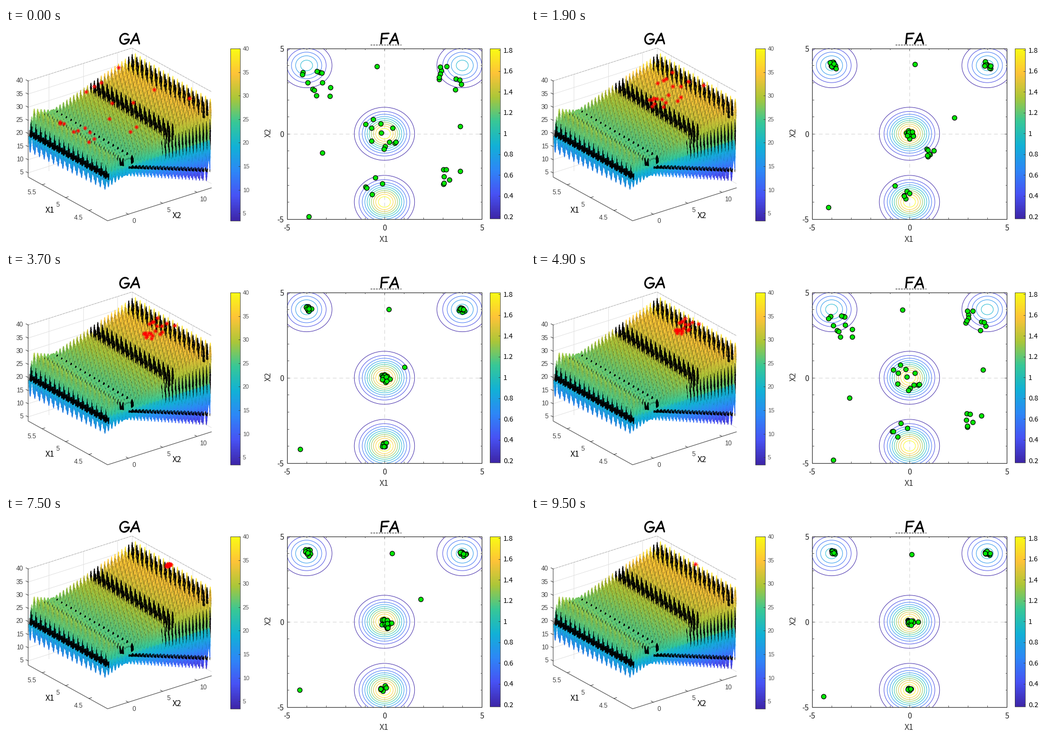
Recreate the animation shown at these times as a matplotlib script. Size 960 by 400 pixels, loop 9700 ms.

```python
import numpy as np
import matplotlib.pyplot as plt
from matplotlib.animation import FuncAnimation
from matplotlib.colors import LinearSegmentedColormap, Normalize
from matplotlib.patches import Rectangle

W, H, DPI = 960, 400, 100
PX = 72 / DPI
SANS, HUMANIST = "Liberation Sans", "Noto Sans CJK JP"

parula = LinearSegmentedColormap.from_list("parula", [
    (0.242, 0.150, 0.660), (0.281, 0.323, 0.958), (0.179, 0.529, 0.968),
    (0.069, 0.695, 0.839), (0.216, 0.784, 0.592), (0.672, 0.779, 0.223),
    (0.997, 0.766, 0.220), (0.977, 0.984, 0.081)])

fig = plt.figure(figsize=(W / DPI, H / DPI), dpi=DPI, facecolor="white")
ax = fig.add_axes([0, 0, 1, 1])
ax.axis("off")


def line(points, color="#404040", width=1.0, z=3, **kw):
    x, y = zip(*points)
    ax.plot(x, y, color=color, lw=width * PX, zorder=z, **kw)


def label(x, y, s, size, font=SANS, color="#404040", ha="center"):
    ax.text(x, y + 0.36 * size, s, fontsize=size * PX, family=font,
            color=color, ha=ha, va="baseline", zorder=6)


def frame(x0, x1, y0, y1, width):
    ax.add_patch(Rectangle((x0, y0), x1 - x0, y1 - y0, fill=False,
                           ec="#383838", lw=width * PX, zorder=3))


def colorbar(x0, x1, y0, y1):
    ramp = np.linspace(1, 0, 256)[:, None]
    ax.imshow(ramp, cmap=parula, extent=(x0, x1, y1, y0), aspect="auto", zorder=2)
    frame(x0, x1, y0, y1, 0.8)


# ---- handwritten titles ----
def stroke(points):
    slanted = [(x + (20 - y) * 0.1, y) for x, y in points]
    line(slanted, "black", 3, 6, solid_capstyle="round", solid_joinstyle="round")


def letter_a(x):
    stroke([(x, 29), (x + 8.5, 10), (x + 16, 29)])
    stroke([(x + 3.5, 23), (x + 13.5, 22.5)])


bow = np.radians(np.linspace(-50, -345, 40))
stroke([(219.5 + 8.5 * np.cos(a), 20 + 9.5 * np.sin(a)) for a in bow] + [(228, 21), (220, 21.5)])
letter_a(231.5)
stroke([(707, 10), (694.5, 10.5), (694.5, 29)])
stroke([(694.5, 19.5), (705, 19)])
letter_a(710.5)
line([(674, 30.5), (731, 30.5)], "black", 1, 4, dashes=(3, 2))

# ---- left panel: 3-D surface ----
U0, U1, V0, V1, Z0, Z1 = -3, 12.1, 4.1, 5.8, 3.4, 40


def project(u, v, z):
    a, b, c = (u - U0) / (U1 - U0), (v - V0) / (V1 - V0), (z - Z0) / (Z1 - Z0)
    return 188 + 192 * a - 147 * b, 357 - 61 * a - 81 * b - 178 * c


def crest(u, v):
    return 21.5 + np.abs(u) + v


def render_surface(size=400, scale=2, nu=5000, nv=3000):
    """Paint rows from back to front, then average down to pixels."""
    n = size * scale
    height = np.full((n, n), np.nan)
    ink = np.ones((n, n))
    u = np.linspace(U0, U1, nu)
    wave = u * np.sin(4 * np.pi * u)
    mesh = np.where(np.abs(u % 0.5 - 0.07) < 0.012, 0.72, 1.0)
    bands = (np.abs(u - 6.1) < 0.55) | (np.abs(u - 11.3) < 0.55)
    dotted = (np.abs(u + 0.9) < 0.3) | (np.abs(u - 0.65) < 0.2)
    curtain = (u > 5) & (np.abs((u + 0.25) % 0.5 - 0.25) < 0.025)
    left_face, right_face = u < -2.5, u > 0.4
    for v in np.linspace(V1, V0, nv):
        z = 21.5 + wave + v * np.sin(20 * np.pi * v)
        top = crest(u, v)
        phase = v % 0.1
        dark = left_face & (np.abs(z - 20) < 1.2)
        if phase % 0.05 < 0.034:
            dark |= bands & (z > top - 6)
        if phase % 0.05 < 0.014:
            dark |= dotted & (z > top - 4)
        if abs(phase - 0.042) < 0.006:
            dark |= left_face
        if v < V0 + 0.03:
            dark |= curtain
        if v < V0 + 0.1:
            dark |= right_face & (np.abs(z - 21 + 0.95 * u) < 0.7)
        x, y = project(u, v, z)
        ix, iy = (x * scale).astype(int), (y * scale).astype(int)
        height[iy, ix] = np.where(z > 21.5, z + 0.3 * (top - z), z)
        ink[iy, ix] = np.where(dark, 0.02, 0.72 if abs(phase - 0.012) < 0.0015 else mesh)
    seen = ~np.isnan(height)
    rgba = parula(Normalize(Z0, Z1)(np.where(seen, height, Z0)))
    rgba[..., :3] *= (ink * seen)[..., None]
    rgba[..., 3] = seen
    rgba = rgba.reshape(size, scale, size, scale, 4).mean(axis=(1, 3))
    rgba[..., :3] /= np.maximum(rgba[..., 3:], 1e-6)
    return np.clip(rgba, 0, 1)


GRID = "#dcdcdc"
for z in range(5, 41, 5):
    line([project(U0, V1, z), project(U1, V1, z), project(U1, V0, z)], GRID, 0.8, 0.5)
    x, y = project(U0, V1, z)
    line([(x, y), (x - 4, y - 2)])
    label(32, y - 1, str(z), 11.7, ha="right")
for u in (0, 5, 10):
    line([project(u, V1, Z0), project(u, V1, Z1)], GRID, 0.8, 0.5)
    x, y = project(u, V0, Z0)
    line([(x, y), (x - 4, y - 2.2)])
    label(x + 11, y + 12, str(u), 11.7)
for v in (4.5, 5, 5.5):
    line([project(U1, v, Z0), project(U1, v, Z1)], GRID, 0.8, 0.5)
    x, y = project(U0, v, Z0)
    line([(x, y), (x + 5, y - 1.6)])
    label(x - 11, y + 13, f"{v:g}", 11.7, ha="right")
line([project(U0, V1, Z1), project(U1, V1, Z1), project(U1, V0, Z1)],
     "#a8a8a8", 0.8, 0.6, dashes=(5, 2))
line([project(U1, V1, Z0), project(U1, V1, Z1)], GRID, 0.8, 0.5)
line([project(U0, V1, Z1), project(U0, V1, Z0), project(U0, V0, Z0), project(U1, V0, Z0)])
label(81, 336.5, "X1", 15, HUMANIST, "black")
label(316, 347, "X2", 15, HUMANIST, "black")
ax.imshow(render_surface(), extent=(0, 400, 400, 0), aspect="auto",
          interpolation="nearest", zorder=2)

colorbar(415, 433, 38, 357)
for z in range(5, 41, 5):
    y = 38 + (40 - z) * 8.72
    line([(430, y), (433, y)], width=0.8, z=4)
    label(438, y, str(z), 11, color="#505050", ha="left")


# ---- right panel: contour map ----
def to_map(x, y):
    return 700 + 36 * x, 195.75 - 31.6 * y


gx, gy = np.meshgrid(np.linspace(-5, 5, 301), np.linspace(-5, 5, 301))


def bump(x, y):
    return np.exp(-(gx - x) ** 2 - (gy - y) ** 2)


peaks = bump(4, 4) + bump(-4, 4) + 2 * (bump(0, 0) + bump(0, -4))
levels = np.arange(1, 11) * 2 / 11
line([to_map(0, -5), to_map(0, 5)], "#d4d4d4", 1, 1, dashes=(7, 5))
line([to_map(-5, 0), to_map(5, 0)], "#d4d4d4", 1, 1, dashes=(7, 5))
ax.contour(*to_map(gx, gy), peaks, levels, cmap=parula,
           vmin=levels[0], vmax=levels[-1], linewidths=0.9 * PX, zorder=2)
frame(520, 880, 38, 354, 1.2)
for t in range(-4, 5):
    size = 4 if t == 0 else 2.5
    for side in (-1, 1):
        x, y = to_map(t, 5 * side)
        line([(x, y), (x, y + side * size)], width=0.8)
        x, y = to_map(5 * side, t)
        line([(x, y), (x - side * size, y)], width=0.8)
for t in (-5, 0, 5):
    x, y = to_map(t, t)
    label(x, 370, str(t), 14, HUMANIST, "#202020")
    label(514, y + 1, str(t), 14, HUMANIST, "#202020", "right")
label(699.5, 391, "X1", 15, HUMANIST, "#303030")
ax.text(486, 194, "X2", fontsize=15 * PX, family=HUMANIST, color="#303030",
        rotation=90, ha="center", va="center")

colorbar(895, 914, 38, 353)
for n in range(1, 10):
    y = 349 - (n - 1) * 38.5
    line([(911, y), (914, y)], width=0.8, z=4)
    label(920, y, f"{n / 5:g}", 13, HUMANIST, "black", "left")

# ---- genetic population: each star jumps now and then, closing in on the best crest ----
STARS = 20
rng = np.random.default_rng(4)
below, aside = rng.random(STARS), rng.uniform(-0.5, 0.5, STARS)
turn = np.arange(STARS) % 3


def star_positions(step):
    last_jump = np.maximum(step - (step + turn) % 3, 0) if step < 48 else np.full(STARS, 48)
    reach = np.interp(last_jump, [0, 6, 14, 30, 38, 48], [1, 0.5, 0.28, 0.12, 0.01, 0])
    u = 11.74 - 14.6 * reach * below
    v = 4.93 + 1.6 * reach * aside
    pos = np.column_stack(project(u, v, crest(u, v)))
    return np.unique(pos.round(1), axis=0)


# ---- fireflies: count, starting spread and path of each swarm, in map units ----
PATH_TIMES = [0, 6, 14, 24]
SWARMS = [
    (12, 1.1, [(-3.6, 2.9), (-3.95, 4.05)]),
    (10, 0.9, [(3.3, 3.3), (4, 4)]),
    (12, 1.0, [(-0.25, 0), (0, 0)]),
    (5, 0.6, [(-0.5, -3.1), (-0.25, -3.2), (0, -3.95)]),
    (7, 0.6, [(3.4, -2.5), (2.05, -2.15), (0.1, -0.1)]),
    (1, 0, [(-0.4, 3.95), (0.1, 4.15), (0.4, 4.0), (0.1, 3.95)]),
    (1, 0, [(-3.9, -4.85), (-4, -4.6), (-4.3, -4), (-4.4, -4.35)]),
    (1, 0, [(3.9, 0.45), (2.7, 0.45), (1.9, 1.4), (0.3, -0.1)]),
    (1, 0, [(-3.2, -1.1), (-1.65, -2.2), (0, -4)]),
]
counts = [count for count, _, _ in SWARMS]
start_spread = np.repeat([spread for _, spread, _ in SWARMS], counts)[:, None]
paths = np.repeat([path + path[-1:] * (4 - len(path)) for _, _, path in SWARMS],
                  counts, axis=0)
angle = rng.uniform(0, 2 * np.pi, len(paths))
offset = np.sqrt(rng.random(len(paths))) * np.array([np.cos(angle), np.sin(angle)])
offset = offset.T


def fly_positions(step):
    t = step if step <= 24 else step - 24.5
    centre = np.array([[np.interp(t, PATH_TIMES, p[:, axis]) for axis in (0, 1)] for p in paths])
    settled = np.minimum(start_spread, 0.28 - 0.006 * t)
    spread = settled + (start_spread - settled) * np.exp(-t / 2)
    jitter = np.random.default_rng(step).normal(0, 0.04, centre.shape)
    pos = centre + spread * offset + jitter * min(t, 1)
    return np.column_stack(to_map(*pos.T))


stars, = ax.plot([], [], ls="", marker=(8, 2, 0), ms=8 * PX, mec="red", mfc="red",
                 mew=0.8 * PX, zorder=5)
flies, = ax.plot([], [], ls="", marker="o", ms=8.6 * PX, mfc="#00e800", mec="black",
                 mew=1.2 * PX, zorder=5)
ax.set_xlim(0, W)
ax.set_ylim(H, 0)


def update(i):
    step = (i + 1) // 2
    stars.set_data(*star_positions(step).T)
    flies.set_data(*fly_positions(step).T)
    return stars, flies


anim = FuncAnimation(fig, update, frames=97, interval=100, repeat=True, repeat_delay=0)
plt.show()
```
